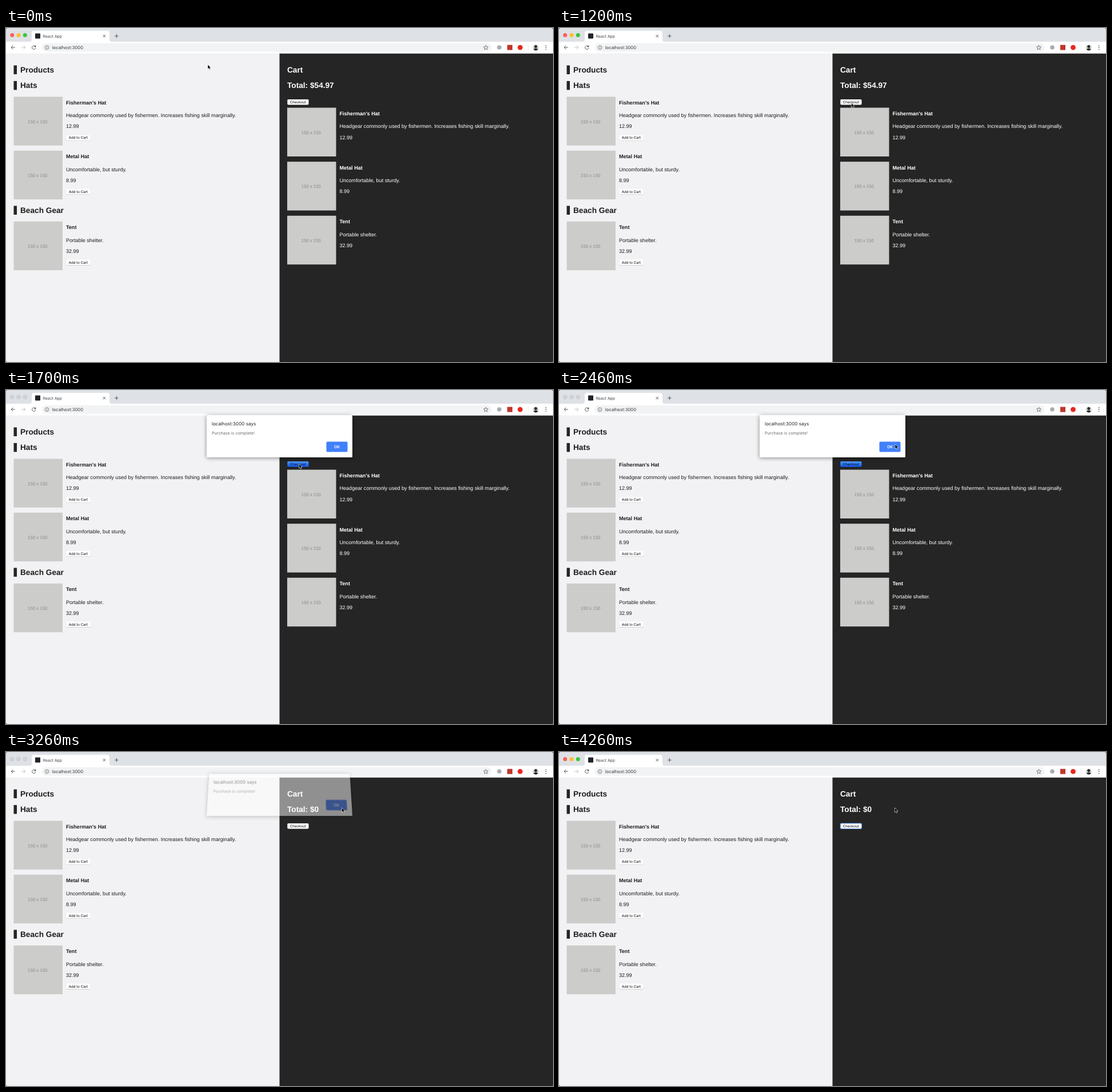
These frames come from a looping animation (957 by 585 pixels, 4.76 s). An HTML page:

```html
<!DOCTYPE html>
<html lang="en">
<head>
<meta charset="utf-8">
<title>Shop</title>
<style>
  html, body { margin: 0; width: 100%; height: 100%; overflow: hidden; background: #000; }
  #stage { position: relative; width: 957px; height: 585px; overflow: hidden; border-radius: 2px; }
  svg { position: absolute; left: 0; top: 0; display: block; }
  text { white-space: pre; text-rendering: geometricPrecision; }
  .page { font: 9.11px "Liberation Sans", Arial, sans-serif; }
  .page .b { font-weight: bold; }
  .page .h { font-weight: bold; font-size: 13.67px; }
  .page .size { font-size: 7.8px; fill: #989898; stroke: #989898; stroke-width: .15; text-anchor: middle; }
  .ui { font-family: Inter, sans-serif; }
  .label { font: 6.2px Inter, sans-serif; fill: #000; text-anchor: middle; }
  .line { fill: none; stroke: #54575b; stroke-width: 1; }
  #dialog { position: absolute; left: 351px; top: 43.5px; width: 255px; height: 74px; background: #fff;
    border-radius: 1.5px; box-shadow: 0 1px 7px rgba(0,0,0,.45); transform-origin: 50% 100%; }
</style>
</head>
<body>
<div id="stage">
  <svg id="scene" width="957" height="585"></svg>
  <div id="dialog">
    <svg class="ui" width="255" height="74">
      <text x="9" y="17.8" font-size="8.15" fill="#202124">localhost:3000 says</text>
      <text x="9" y="34.3" font-size="7.2" fill="#6a6d71">Purchase is complete!</text>
      <rect id="ok" x="209.5" y="46.5" width="37" height="18" rx="2"/>
      <text x="228" y="58" font-size="6.9" font-weight="600" fill="#fff" text-anchor="middle">OK</text>
    </svg>
  </div>
  <svg width="957" height="585">
    <path id="cursor" d="M0 0V8L1.8 6.3 3 9.1 4.4 8.5 3.2 5.8H5.6Z" fill="#000" stroke="#fff" stroke-width=".6"/>
  </svg>
</div>
<script>
const LOOP = 4760;
const $ = id => document.getElementById(id);
const rect = (x, y, w, h, fill, extra = '') =>
  `<rect x="${x}" y="${y}" width="${w}" height="${h}" fill="${fill}" ${extra}/>`;
const dot = (x, y, r, fill, extra = '') => `<circle cx="${x}" cy="${y}" r="${r}" fill="${fill}" ${extra}/>`;
const text = (x, y, s, cls = '', extra = '') => `<text x="${x}" y="${y}" class="${cls}" ${extra}>${s}</text>`;
const line = (d, extra = '') => `<path class="line" d="${d}" ${extra}/>`;

const products = [
  ["Fisherman's Hat", 'Headgear commonly used by fishermen. Increases fishing skill marginally.', '12.99'],
  ['Metal Hat', 'Uncomfortable, but sturdy.', '8.99'],
  ['Tent', 'Portable shelter.', '32.99']
];

function item([name, about, price], x, y) {
  return rect(x, y, 85.5, 85.4, '#cccccb') + text(x + 41.7, y + 46, '150 x 150', 'size') +
    text(x + 91.4, y + 13.4, name, 'b') + text(x + 91.4, y + 35.7, about) + text(x + 91.4, y + 54.9, price);
}

const addButton = y => rect(105, y + 67, 43, 9.8, '#c4c4c6', 'rx="1.6"') +
  rect(105.2, y + 66.8, 42.6, 9.4, '#fff', 'rx="1.5"') + text(126.4, y + 73.8, 'Add to Cart', 'label');

const heading = (y, s) => rect(13.5, y - 12.5, 5.5, 15.5, '#252525') + text(25, y, s, 'h');

function browser() {
  return rect(0, 0, 957, 25, '#dee1e6') + rect(0, 24, 957, 20.5, '#fff') +
    '<path d="M41 24Q45 24 45 20V9Q45 5 49 5H177Q181 5 181 9V20Q181 24 185 24Z" fill="#fff"/>' +
    '<g id="lights">' + [10.7, 22, 33.3].map(x => dot(x, 12.5, 3.5, '')).join('') + '</g>' +
    rect(51, 9.5, 9, 9, '#20232a', 'rx="1"') +
    text(64.8, 16.6, 'React App', '', 'font-size="6.8" fill="#3c4043"') +
    line('M169.6 12l4.4 4.4m0-4.4l-4.4 4.4M193.4 10.8v6.6m-3.3-3.3h6.6') +
    line('M15.7 34H9m3.2-3.2L9 34l3.2 3.2') +
    line('M27.2 34h6.7m-3.2-3.2L33.9 34l-3.2 3.2', 'style="stroke:#c0c2c5"') +
    line('M51.2 32A3.2 3.2 0 1 0 51.9 35') + '<path d="M52.3 30v3.4h-3.4z" fill="#54575b"/>' +
    rect(62.5, 26.8, 787, 14.6, '#f1f3f4', 'rx="7.3"') +
    dot(71.6, 34.2, 3.4, 'none', 'stroke="#5f6368" stroke-width=".8"') +
    line('M71.6 33.6v2.5M71.6 32.1v.8', 'style="stroke-width:.8"') +
    text(80.7, 37, 'localhost:3000', '', 'font-size="7.7" fill="#35383b"') +
    line('M839.5 30.2l1.1 2.7 2.9.2-2.2 1.9.7 2.9-2.5-1.6-2.5 1.6.7-2.9-2.2-1.9 2.9-.2z', 'style="stroke-width:.8"') +
    dot(863, 34, 3.8, '#a9adb0') + rect(877, 29.6, 9, 9, '#c1352b') + dot(899.5, 34.1, 4.4, '#e8261f') +
    rect(913, 29, .6, 10, '#dfe1e3') + dot(926.8, 34.2, 5.2, '#d5d5d3') +
    dot(926.8, 32.6, 2.5, '#2b2b2b') + '<path d="M922.8 37.5q4-4.2 8 0-4 3.8-8 0z" fill="#2b2b2b"/>' +
    [30.9, 34.2, 37.5].map(y => dot(944.6, y, .85, '#54575b')).join('');
}

$('scene').innerHTML = `
  <defs><linearGradient id="blue" x2="0" y2="1">
    <stop stop-color="#4f9aff"/><stop offset="1" stop-color="#1058ef"/>
  </linearGradient></defs>
  ${rect(0, 44, 957, 541, '#f2f2f4')}${rect(478.5, 44.5, 479, 541, '#252525')}
  <g class="ui">${browser()}</g>
  <g class="page" fill="#1d1d1d">
    ${heading(78, 'Products')}${heading(105.4, 'Hats')}${heading(324, 'Beach Gear')}
    ${[120.5, 214.8, 338.9].map((y, i) => item(products[i], 13.5, y) + addButton(y)).join('')}
  </g>
  <g class="page" fill="#fff">
    ${text(492, 78, 'Cart', 'h')}${text(492, 105.4, '', 'h', 'id="total"')}
    <g id="items">${products.map((p, i) => item(p, 492, 139.6 + i * 94.6)).join('')}</g>
  </g>
  ${rect(492.3, 125, 37.2, 9.4, '#fff', 'rx="1.6" id="checkout"')}
  ${text(510.8, 132.1, 'Checkout', 'label')}`;

// Pointer stops: time, x, y
const stops = [[30, 353, 64], [430, 467, 125], [630, 467, 125], [1130, 511.5, 131.3], [1230, 511.5, 131.3],
  [1500, 512.6, 129.2], [2260, 512.6, 129.2], [2450, 588, 95], [2760, 589.5, 96.5], [2960, 587.4, 97.6]];

const clamp = v => Math.max(0, Math.min(1, v));

function pointer(t) {
  const next = stops.findIndex(s => s[0] > t);
  if (next === 0) return stops[0].slice(1);
  if (next < 0) return stops[stops.length - 1].slice(1);
  const [a, b] = [stops[next - 1], stops[next]];
  const p = (t - a[0]) / (b[0] - a[0]), e = p * p * (3 - 2 * p);
  return [a[1] + (b[1] - a[1]) * e, a[2] + (b[2] - a[2]) * e];
}

function draw(t) {
  const paid = t >= 3230;
  const pressed = t >= 1500 && !paid;
  const inactive = t >= 1590 && t < 3360;
  const focused = t >= 4260;

  $('cursor').setAttribute('transform', `translate(${pointer(t)})`);
  $('total').textContent = paid ? 'Total: $0' : 'Total: $54.97';
  $('items').style.display = paid ? 'none' : '';
  $('checkout').setAttribute('fill', pressed ? 'url(#blue)' : '#fff');
  $('checkout').setAttribute('stroke', focused ? '#5b9cf0' : 'none');
  [...$('lights').children].forEach((c, i) => {
    c.setAttribute('fill', inactive ? '#d0d2d6' : ['#ff5f57', '#febc2e', '#35c73b'][i]);
    c.setAttribute('stroke', inactive ? '#bfc2c6' : 'none');
    c.setAttribute('stroke-width', .5);
  });

  const shown = t < 2500 ? clamp((t - 1580) / 120) : 1 - clamp((t - 3200) / 120);
  const away = 1 - shown, style = $('dialog').style;
  style.opacity = shown;
  style.visibility = shown ? 'visible' : 'hidden';
  style.transform = away
    ? `translateY(${-12 * away}px) scaleY(${1 + .072 * away}) perspective(100px) rotateX(${5.6 * away}deg)` : 'none';
  $('ok').setAttribute('fill', t >= 3100 ? '#4c83f6' : '#4180fb');
}

function tick() {
  draw(performance.now() % LOOP);
  requestAnimationFrame(tick);
}
tick();
</script>
</body>
</html>
```
